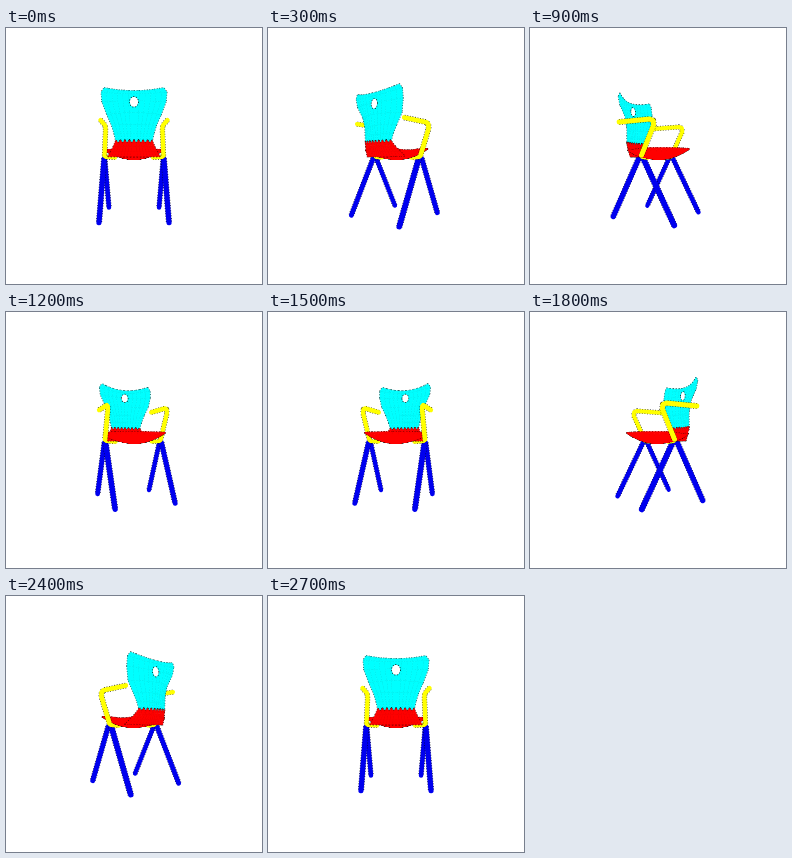
These frames come from a looping animation (256 by 256 pixels, 3 s). An HTML page with a canvas:

```html
<!DOCTYPE html>
<html lang="en">
<head>
<meta charset="utf-8">
<title>Turning chair</title>
<style>
  html, body { margin: 0; width: 100%; height: 100%; overflow: hidden; background: #fff; }
  canvas { display: block; }
</style>
</head>
<body>
<canvas id="stage" width="256" height="256"></canvas>
<script>
const ctx = document.getElementById('stage').getContext('2d');
const STEP = 300, STEPS = 10, TURN = Math.PI * 2 / 9;
const CYAN = '#00ffff', RED = '#ff0000', YELLOW = '#ffff00', BLUE = '#0000ee';

let cos = 1, sin = 0;

// Model axes: x to the side, y down from eye level, z towards the chair's back.
const depth = (x, z) => x * sin + z * cos;
const scale = (x, z) => 1 / (1 - 0.0042 * depth(x, z));
function project([x, y, z]) {
  const s = scale(x, z);
  return [128 + (x * cos - z * sin) * s, 130.6 + y * s];
}

function trace(points, closed) {
  ctx.beginPath();
  points.forEach(p => ctx.lineTo(...project(p)));
  if (closed) ctx.closePath();
}

function speckle(width) {
  ctx.lineCap = 'butt';
  ctx.setLineDash([1, 1.6]);
  ctx.lineWidth = width;
  ctx.strokeStyle = '#000';
  ctx.stroke();
  ctx.setLineDash([]);
}

function tube(points, width, color) {
  const s = points.reduce((sum, p) => sum + scale(p[0], p[2]), 0) / points.length;
  trace(points);
  ctx.lineJoin = 'round';
  speckle(width * s + 0.9);
  ctx.lineCap = 'round';
  ctx.lineWidth = width * s;
  ctx.strokeStyle = color;
  ctx.stroke();
}

function surface(at, nu, nv, color) {
  const cells = [];
  for (let j = 0; j < nv; j++) {
    for (let i = 0; i < nu; i++) {
      cells.push([at(i, j), at(i + 1, j), at(i + 1, j + 1), at(i, j + 1)]);
    }
  }
  for (const c of cells) { trace(c, true); speckle(1.5); }
  ctx.fillStyle = ctx.strokeStyle = color;
  ctx.lineWidth = 0.6;
  for (const c of cells) { trace(c, true); ctx.fill(); ctx.stroke(); }
}

// Back rows: height, half width, depth at the edge, depth in the middle, lift of the edge
const ROWS = [
  [-58.3, 26.5, 27, 33, 4.4],
  [-56, 29, 26.5, 32.8, 3],
  [-50, 28.5, 25, 32, 1],
  [-40, 24.5, 21.5, 31, 0],
  [-30, 20, 23, 30, 0],
  [-22, 17.5, 25, 29, 0],
  [-13, 15.5, 26.5, 29, 0]
];

function back() {
  surface((i, j) => {
    const [y, w, edge, mid, lift] = ROWS[j], u = i / 6 - 1;
    return [u * w, y - lift * u * u, mid + (edge - mid) * u * u];
  }, 12, ROWS.length - 1, CYAN);

  if (Math.abs(cos) > 0.4) {
    const rim = Array.from({ length: 16 }, (_, i) => {
      const a = i * Math.PI / 8;
      return [3.6 * Math.cos(a), -49.5 + 4.4 * Math.sin(a), 30.5];
    });
    trace(rim, true);
    speckle(1.4);
    ctx.fillStyle = '#fff';
    ctx.fill();
  }

  // Ragged red foot of the back
  surface((i, j) => {
    const v = j / 3, u = i / 8 - 1;
    const mid = 29 - 5 * v, edge = 26.5 - 10 * v;
    const tooth = j ? 0 : (i % 2 ? 1.2 : -1.2);
    return [u * (16 + 8 * v), -15 + 13 * v + tooth, mid + (edge - mid) * u * u];
  }, 16, 3, RED);
}

const bulge = v => Math.sign(v) * Math.abs(v) ** 0.85;

function seat() {
  surface((i, j) => {
    const a = i * Math.PI / 16, r = j / 5;
    const x = 29.5 * r * bulge(Math.cos(a));
    const z = -1 + 29 * r * bulge(Math.sin(a));
    const rim = -9.5 + 2.5 * Math.exp(-(((z - 14) / 9) ** 2));
    return [x, 0.5 + (rim - 0.5) * r * r, z];
  }, 32, 5, RED);
}

function arm(side) {
  tube([
    [30 * side, -34.5, 25],
    [30 * side, -34.5, -9],
    [30 * side, -33, -12.5],
    [30 * side, -29, -13],
    [29.5 * side, -3, 0]
  ], 4.4, YELLOW);
}

function leg(side, end) {
  const foot = end > 0 ? 30.3 : 28.4;
  tube([[29.5 * side, 0, end > 0 ? 3 : -2], [foot * side, 55.5, 32 * end]], 4.8, BLUE);
}

const byDepth = parts => parts.sort((a, b) => a[0] - b[0]).forEach(p => p[1]());

function draw(angle) {
  cos = Math.cos(angle);
  sin = Math.sin(angle);
  ctx.fillStyle = '#fff';
  ctx.fillRect(0, 0, 256, 256);

  const legs = [];
  for (const side of [-1, 1]) {
    for (const end of [-1, 1]) {
      legs.push([depth(29 * side, 32 * end), () => leg(side, end)]);
    }
  }
  byDepth(legs);

  for (const side of [-1, 1]) {
    tube([[29.5 * side, -3, 0], [28 * side, -1.5, 0], [19 * side, -1, 0]], 4, YELLOW);
  }
  byDepth([
    [0, seat],
    [depth(0, 27), back],
    [depth(-30, 0) + 0.1, () => arm(-1)],
    [depth(30, 0) + 0.1, () => arm(1)]
  ]);
}

const start = performance.now();
let shown = -1;
function tick() {
  const step = Math.floor((performance.now() - start) / STEP) % STEPS;
  if (step !== shown) {
    shown = step;
    draw(step * TURN);
  }
  requestAnimationFrame(tick);
}
tick();
</script>
</body>
</html>
```
